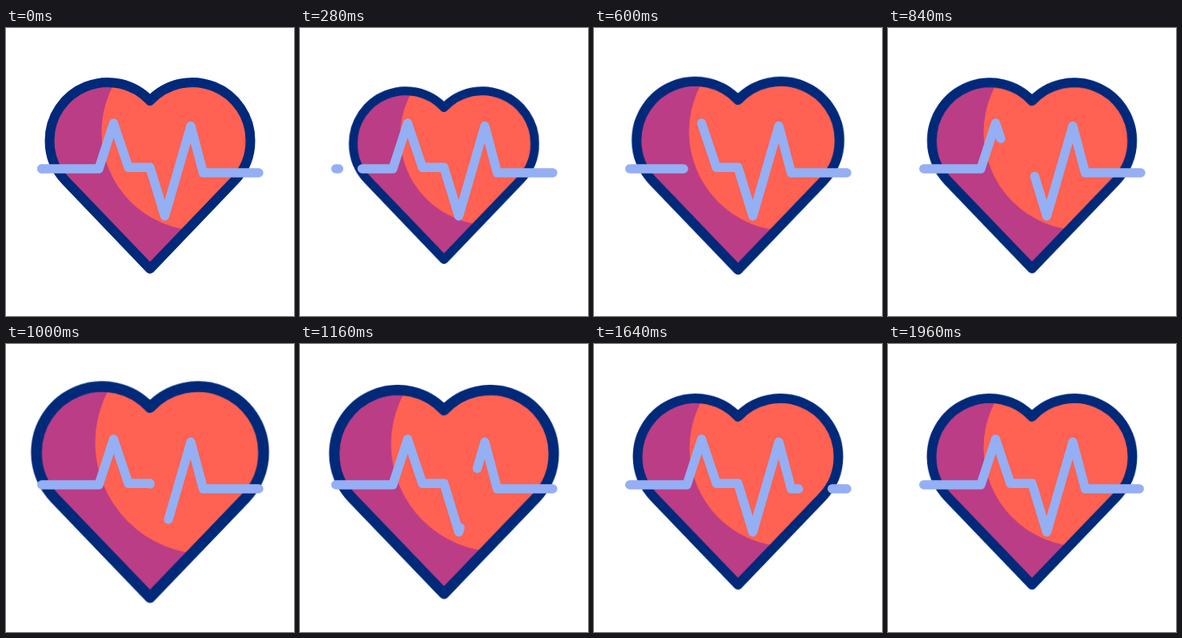
Animation, 360 px wide and 360 px high, one loop 2 s. Source, as an HTML page:

```html
<!DOCTYPE html>
<html lang="en">
<head>
<meta charset="utf-8">
<title>Heartbeat</title>
<style>
  html, body {
    margin: 0;
    width: 100%;
    height: 100%;
    overflow: hidden;
    background: #fff;
  }
  svg { display: block; width: 100vw; height: 100vh; }

  .heart {
    transform-origin: 180px 180px;
    animation: beat 2s cubic-bezier(.333, 0, .667, 1) infinite;
  }
  .outline {
    fill: none;
    stroke: #00297a;
    stroke-width: 12;
    stroke-linejoin: round;
  }
  .pulse {
    fill: none;
    stroke: #94aff4;
    stroke-width: 11.4;
    stroke-linecap: round;
    stroke-linejoin: round;
  }
  /* A gap runs along the pulse: one copy is erased, the other redrawn. */
  .erased { stroke-dasharray: 600 600; animation: erase 2s infinite; }
  .redrawn { stroke-dasharray: 0 1200; animation: redraw 2s infinite; }

  @keyframes beat {
    0% { transform: scale(1); }
    13% { transform: scale(.9); }
    24.25% { transform: scale(1.088); }
    36% { transform: scale(.93); }
    52% { transform: scale(1.14); }
    67.5%, 100% { transform: scale(1); }
  }
  @keyframes erase {
    0% {
      stroke-dashoffset: 0;
      animation-timing-function: cubic-bezier(.333, 0, .667, 1);
    }
    92.4%, 100% { stroke-dashoffset: -528; }
  }
  @keyframes redraw {
    0% { stroke-dasharray: 0 1200; }
    9.5% {
      stroke-dasharray: 0 1200;
      animation-timing-function: cubic-bezier(.333, 0, .667, .969);
    }
    100% { stroke-dasharray: 528 1200; }
  }
</style>
</head>
<body>
<svg viewBox="0 0 360 360">
  <defs>
    <path id="shape" d="M180 91A72.5 72.5 0 0 0 54.5 141A72.5 72.5 0 0 0 74.7 191.2L180 301L285.3 191.2A72.5 72.5 0 0 0 305.5 141A72.5 72.5 0 0 0 180 91Z"/>
    <path id="trace" pathLength="528" d="M44.7 176H116L134.5 119L153 174.3H180L198.5 235L231 122.5L246.5 181H316"/>
    <clipPath id="inside"><use href="#shape"/></clipPath>
  </defs>
  <g class="heart">
    <use href="#shape" fill="#bb3d86"/>
    <g clip-path="url(#inside)"><circle cx="242.4" cy="130" r="123" fill="#ff6152"/></g>
    <use href="#shape" class="outline"/>
  </g>
  <use href="#trace" class="pulse erased"/>
  <use href="#trace" class="pulse redrawn"/>
</svg>
</body>
</html>
```
